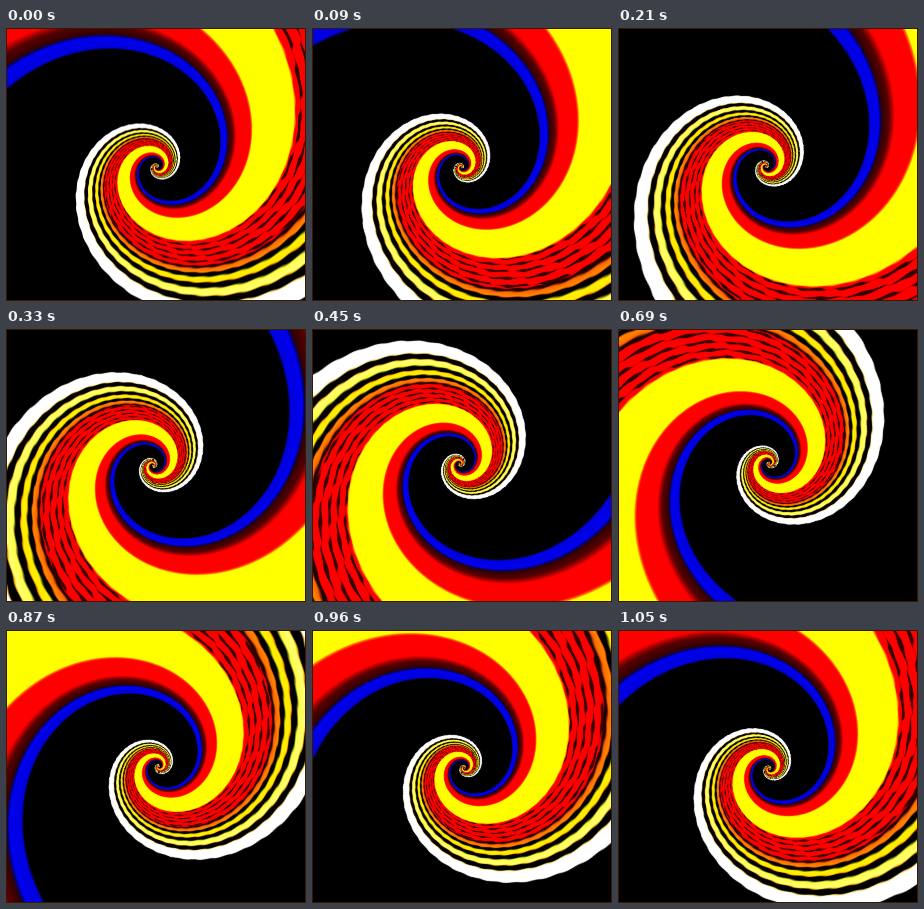
Write an HTML page with a canvas that moves like this. It is 300 by 273 pixels and loops after 1.08 s.

```html
<!DOCTYPE html>
<html>
<head>
<meta charset="utf-8">
<title>Spiral</title>
<style>
html, body { margin: 0; height: 100%; overflow: hidden; background: #000; }
canvas { display: block; }
</style>
</head>
<body>
<canvas id="stage" width="300" height="273"></canvas>
<script>
const W = 300, H = 273, LOOP = 1080, STEP = 30;
const SCALE = 2, RADIUS = 206, SIZE = RADIUS * 2 * SCALE;

// Logarithmic spiral r = R0 * e^(GROWTH * angle), its eye slightly off the turning point
const GROWTH = .398, R0 = 75.4, EYE_X = 1, EYE_Y = 2.5;

// Colours across the arm: degrees behind the outer edge, colour
const stops = ('0 000,1 fff,15 fff,16 fd6,17 000,23 000,24 fb0,25 ff7,32 ff4,34 000,39 000,' +
  '40 f90,41 fe0,46 fe0,48 000,52 000,53 f60,54 f80,58 f60,60 200,62 200,63 f00,103 f00,' +
  '104 f80,105 ff0,157 ff0,158 f70,160 f00,184 f00,187 a00,191 500,199 300,' +
  '201 006,203 00e,215 00d,217 000,360 000')
  .split(',').map(s => {
    const [deg, hex] = s.split(' ');
    return [+deg, ...[...hex].map(c => parseInt(c, 16) * 17)];
  });

function colourAt(deg) {
  const i = stops.findIndex(s => s[0] > deg), a = stops[i - 1], b = stops[i];
  const mix = (deg - a[0]) / (b[0] - a[0]);
  return [1, 2, 3].map(c => a[c] + (b[c] - a[c]) * mix);
}

const PER_DEG = 8;
const palette = Array.from({ length: 360 * PER_DEG }, (_, i) => colourAt(i / PER_DEG));

function paintSpiral() {
  const art = document.createElement('canvas');
  art.width = art.height = SIZE;
  const g = art.getContext('2d'), img = g.createImageData(SIZE, SIZE);
  const toDeg = 180 / Math.PI;
  for (let y = 0, p = 0; y < SIZE; y++) {
    for (let x = 0; x < SIZE; x++, p += 4) {
      const dx = (x + .5) / SCALE - RADIUS - EYE_X, dy = (y + .5) / SCALE - RADIUS - EYE_Y;
      const wind = Math.log(Math.hypot(dx, dy) / R0) / GROWTH * toDeg;
      const dir = Math.atan2(dy, -dx) * toDeg;
      let deg = ((dir - wind) % 360 + 360) % 360;
      if (deg < 104) deg = Math.max(0, deg + .5 * Math.sin(wind * .75));
      let light = 1;
      // Dark, slightly slanted brush strokes in the red part
      if (deg > 62 && deg < 103) {
        const stroke = Math.sin(deg * .72 + wind * .06) + .35 * Math.sin(wind * .35 - deg * .2);
        light = Math.min(1, Math.max(.2, (.85 - stroke) * 4));
      }
      const rgb = palette[Math.floor(deg * PER_DEG) % palette.length];
      for (let c = 0; c < 3; c++) img.data[p + c] = rgb[c] * light;
      img.data[p + 3] = 255;
    }
  }
  g.putImageData(img, 0, 0);
  return art;
}

const art = paintSpiral();
const ctx = document.getElementById('stage').getContext('2d');
ctx.imageSmoothingQuality = 'high';
ctx.strokeStyle = '#3a1800';
const start = performance.now();

function draw() {
  const t = Math.max(0, performance.now() - start) % LOOP;
  const turn = Math.floor(t / STEP) * STEP / LOOP;
  ctx.setTransform(1, 0, 0, 1, W / 2, H / 2);
  ctx.rotate(turn * 2 * Math.PI);
  ctx.drawImage(art, -RADIUS, -RADIUS, RADIUS * 2, RADIUS * 2);
  ctx.resetTransform();
  ctx.strokeRect(.5, .5, W - 1, H - 1);
  requestAnimationFrame(draw);
}
draw();
</script>
</body>
</html>
```
